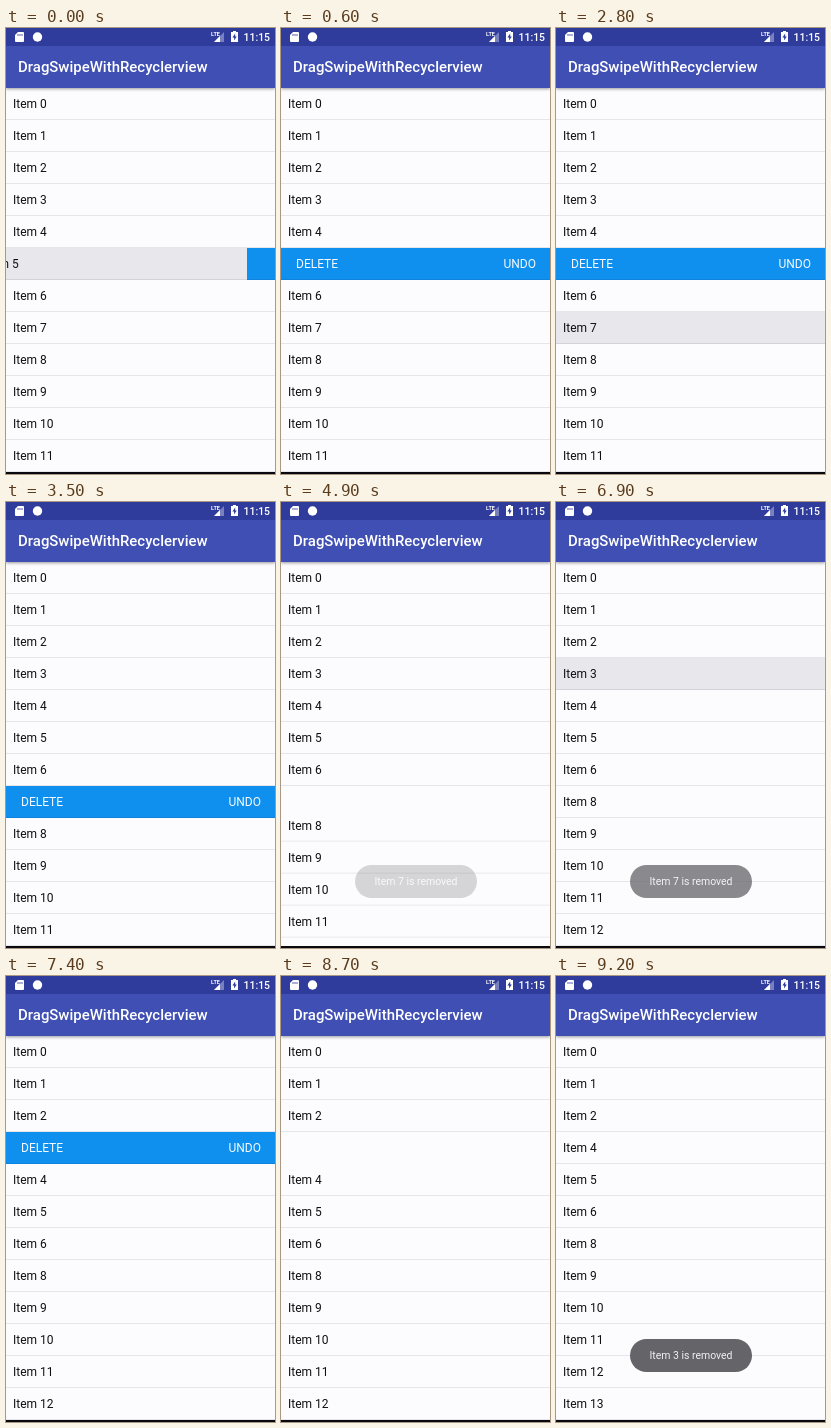
Recreate the animation shown at these times as an HTML page. Size 269 by 446 pixels, loop 9.3 s.

```html
<!DOCTYPE html>
<html lang="en">
<head>
<meta charset="utf-8">
<title>Swipe to delete</title>
<style>
  html, body { margin: 0; width: 100%; height: 100%; overflow: hidden; }
  body { background: #fcfbfe; font: 12px Roboto, sans-serif; color: #101012; }
  #stage { position: relative; width: 269px; height: 446px; overflow: hidden; background: #fcfbfe; }
  #stage div, #stage svg { position: absolute; white-space: nowrap; }
  .status { left: 0; top: 0; width: 269px; height: 18px; background: #303c9c; }
  .bar {
    left: 0; top: 18px; width: 269px; height: 42px; background: #3f4fb3;
    box-shadow: 0 1px 3px rgba(0, 0, 0, .4);
  }
  .title { left: 12px; top: 0; line-height: 43px; font-size: 14.94px; font-weight: 500; color: #fff; }
  .row { left: 0; top: 60px; width: 269px; height: 32px; line-height: 32px; overflow: hidden; }
  .row::after {
    content: ""; position: absolute; left: 0; top: 31px; width: 269px; height: 1px;
    background: rgba(30, 30, 60, .1);
  }
  .back, .undo, .front { left: 0; top: 0; width: 269px; height: 32px; }
  .back, .undo { background: #0f90ee; }
  .front { background: #fcfbfe; text-indent: 7px; }
  .front.pressed { background: #e8e8ec; }
  .undo { color: #f4f9ff; }
  .undo div { top: 0; }
  .delete { left: 15px; }
  .restore { right: 14px; }
  .toast {
    left: 74px; top: 363px; width: 122px; height: 33px; border-radius: 17px;
    background: #656468; color: #f2f2f4; text-align: center; line-height: 34px; font-size: 10.46px;
  }
  .nav { left: 0; top: 444px; width: 269px; height: 2px; background: #08080e; }
</style>
</head>
<body>
<div id="stage">
  <div id="list"></div>
  <div class="bar"><div class="title">DragSwipeWithRecyclerview</div></div>
  <div class="status">
    <svg width="269" height="18" fill="#fff" font-family="Roboto, sans-serif">
      <path d="M12 4h5q1 0 1 1v8q0 1-1 1h-7q-1 0-1-1V7z"/>
      <path d="M12 6v2M14 6v2M16 6v2" stroke="#303c9c" stroke-width=".8"/>
      <circle cx="31.5" cy="9" r="4.7"/>
      <path d="M218 4v10h-10z" opacity=".35"/>
      <path d="M214 8v6h-6z"/>
      <text x="205" y="8" font-size="5.5" font-weight="700">LTE</text>
      <path d="M227 4V3h3v1h2v10h-7V4z"/>
      <path d="M229.2 5.5l-2.8 4h1.7v3l2.7-4h-1.6z" fill="#303c9c"/>
      <text x="237.5" y="13" font-size="10.46" font-weight="500">11:15</text>
    </svg>
  </div>
  <div class="toast" id="toast"></div>
  <div class="nav"></div>
</div>
<script>
  const LOOP = 9300, WIDTH = 269, ROW = 32;

  // Times at which the picture changes; it holds in between.
  const span = (a, b) => Array.from({ length: (b - a) / 100 + 1 }, (_, i) => a + i * 100);
  const steps = [0, 100, ...span(300, 600), ...span(2800, 3000), 3200, 3300, 3500,
    ...span(4700, 5200), ...span(6900, 7400), ...span(8600, 8900), 9100, 9200];

  const ramp = (t, a, b) => Math.min(1, Math.max(0, (t - a) / (b - a)));
  const easeOut = p => 1 - (1 - p) ** 2;
  const easeInOut = p => p * p * (3 - 2 * p);

  function add(parent, cls, text = "") {
    const el = document.createElement("div");
    el.className = cls;
    el.textContent = text;
    parent.append(el);
    return el;
  }

  const list = document.getElementById("list");
  const toast = document.getElementById("toast");
  const rows = Array.from({ length: 14 }, (_, i) => {
    const el = add(list, "row");
    const back = add(el, "back");
    const front = add(el, "front", "Item " + i);
    const undo = add(el, "undo");
    add(undo, "delete", "DELETE");
    add(undo, "restore", "UNDO");
    return { el, back, front, undo };
  });

  function swipe(i, x, undo, pressed) {
    const { back, front, undo: panel } = rows[i];
    front.style.transform = `translateX(${x}px)`;
    front.classList.toggle("pressed", pressed);
    back.style.visibility = x < 0 ? "visible" : "hidden";
    panel.style.opacity = undo;
  }

  function draw(t) {
    const restored = t >= 3100;
    swipe(5,
      restored ? 0 : -28 - (WIDTH - 28) * ramp(t, 0, 300),
      restored ? 1 - ramp(t, 3100, 3500) : ramp(t, 300, 600),
      !restored);
    swipe(7, -WIDTH * ramp(t, 2800, 3100), ramp(t, 3100, 3500), t >= 2800);
    swipe(3, -WIDTH * ramp(t, 6900, 7200), ramp(t, 7200, 7400), t >= 6900);

    rows[7].el.style.opacity = 1 - ramp(t, 4600, 4800);
    rows[3].el.style.opacity = 1 - ramp(t, 8500, 8700);
    const close7 = easeInOut(ramp(t, 4800, 5100));
    const close3 = easeOut(ramp(t, 8700, 9000));
    rows.forEach(({ el }, i) => {
      const slot = i - (i > 7 ? close7 : 0) - (i > 3 ? close3 : 0);
      el.style.transform = `translateY(${slot * ROW}px)`;
    });

    const second = t >= 8000;
    toast.textContent = `Item ${second ? 3 : 7} is removed`;
    toast.style.opacity = second
      ? ramp(t, 8700, 9200)
      : ramp(t, 4800, 5200) - ramp(t, 6800, 7200);
  }

  rows.forEach(({ back, undo }) => {
    back.style.visibility = "hidden";
    undo.style.opacity = 0;
  });

  const start = performance.now();
  function tick() {
    const t = (performance.now() - start) % LOOP;
    draw(steps.findLast(s => s <= t) ?? 0);
    requestAnimationFrame(tick);
  }
  tick();
</script>
</body>
</html>
```
